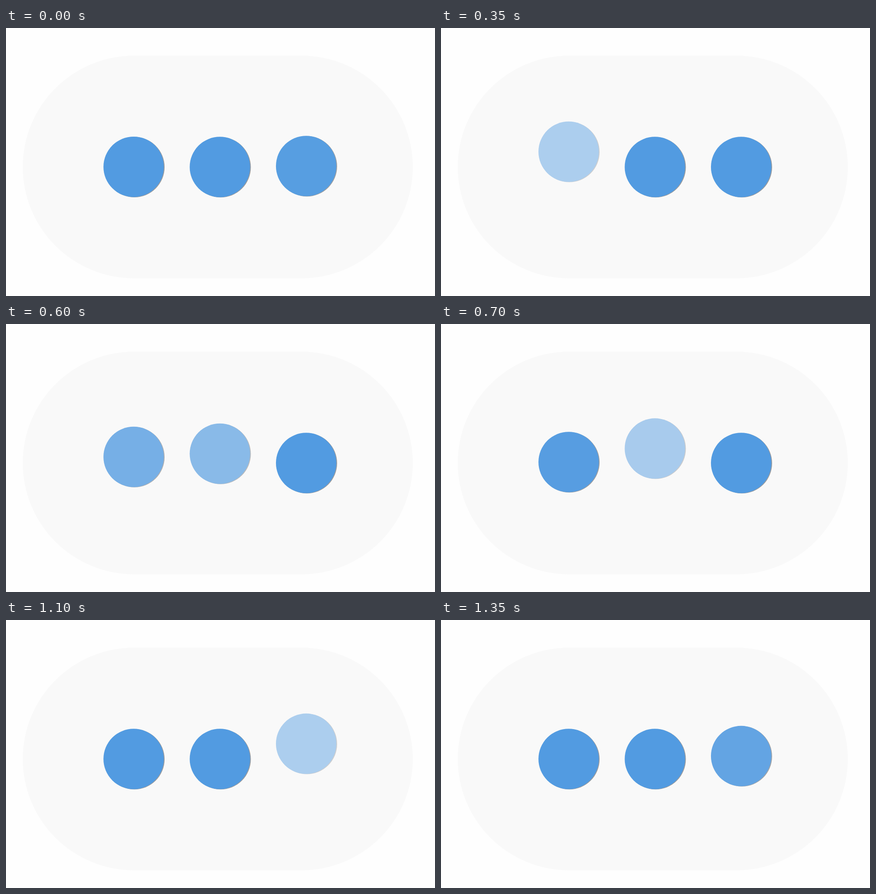
An HTML page that plays this animation: 947 px wide and 592 px high, repeating every 1400 ms.

```html
<!DOCTYPE html>
<html lang="en">
<head>
<meta charset="utf-8">
<title>Typing indicator</title>
<style>
  html, body { margin: 0; height: 100%; overflow: hidden; background: #fefefe; }
  svg { display: block; width: 100vw; height: 100vh; }
</style>
</head>
<body>
<svg viewBox="0 0 947 592">
  <defs>
    <g id="dot">
      <circle cx="1.6" cy=".6" r="66.7" fill="#999a9c"/>
      <circle r="66.7" fill="#529be1"/>
    </g>
  </defs>
  <rect x="37" y="61" width="861" height="492" rx="246" fill="#f9f9f9"/>
  <use class="dot" href="#dot"/>
  <use class="dot" href="#dot"/>
  <use class="dot" href="#dot"/>
</svg>
<script>
const LOOP = 1400, STEP = 50, CYCLE = 3.78, LIFT = 34, FADE = 0.55;
const dots = document.querySelectorAll('.dot');

// Slightly uneven pace: [ms, beat]; each dot rises for one beat and falls for one.
const pace = [[0, .06], [200, .597], [500, 1.29], [700, 1.842], [900, 2.533],
              [1100, 3.06], [1350, 3.713], [1400, 3.84]];

function beatAt(t) {
  const i = pace.findIndex(([ms]) => ms > t);
  const [t0, b0] = pace[i - 1], [t1, b1] = pace[i];
  return b0 + (b1 - b0) * (t - t0) / (t1 - t0);
}

function bump(x) {
  return x < 2 ? (1 - Math.cos(Math.PI * x)) / 2 : 0;
}

function draw(now) {
  const t = Math.floor(now % LOOP / STEP) * STEP;
  const beat = beatAt(t);
  dots.forEach((dot, i) => {
    const h = bump((beat - i + CYCLE) % CYCLE);
    dot.setAttribute('transform', `translate(${281.8 + 190.4 * i} ${307 - LIFT * h})`);
    dot.setAttribute('opacity', 1 - FADE * h);
  });
}

function tick() {
  draw(performance.now());
  requestAnimationFrame(tick);
}
tick();
</script>
</body>
</html>
```
